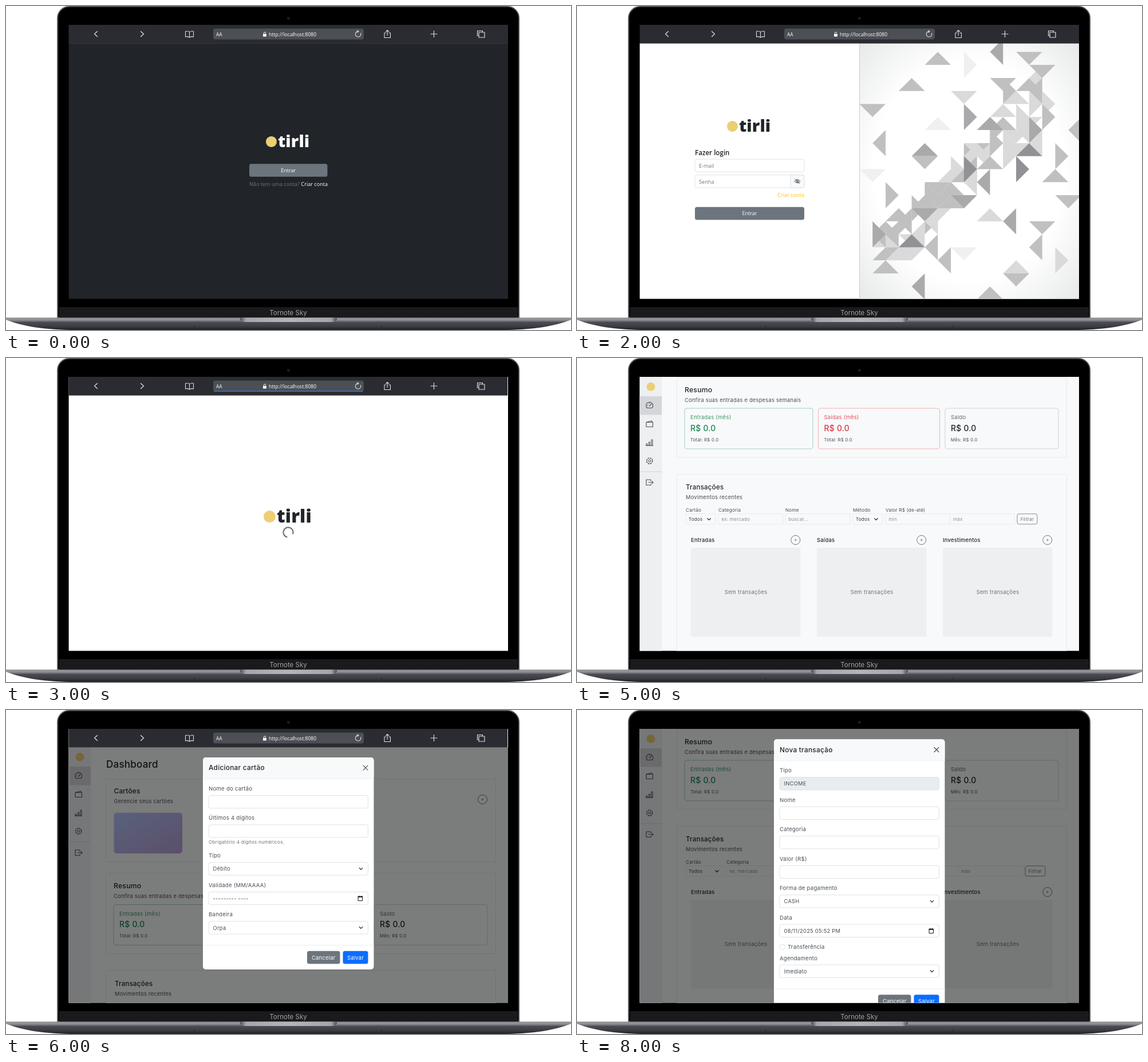
An HTML page that plays this animation: 987 px wide and 567 px high, repeating every 9000 ms.

```html
<!DOCTYPE html>
<html lang="pt">
<head>
<meta charset="utf-8">
<style>
  html, body { margin: 0; width: 100%; height: 100%; overflow: hidden; background: #fff }
  svg { display: block; width: 987px; height: 567px; font-family: "Open Sans", "Noto Sans", sans-serif }
  .app { font-family: Inter, sans-serif; letter-spacing: .015em }
  .line { fill: none; stroke-linecap: round; stroke-linejoin: round }
</style>
</head>
<body>
<svg id="stage" viewBox="0 0 987 567"></svg>
<script>
const INK = '#212529', GRAY = '#6c757d', SOFT = '#495057', RULE = '#dee2e6', PAPER = '#f8f9fa';

const text = (x, y, s, size, fill = INK, more = '') =>
  `<text x="${x}" y="${y}" font-size="${size}" fill="${fill}" ${more}>${s}</text>`;
const box = (x, y, x2, y2, fill, stroke = 'none', r = 0) =>
  `<rect x="${x}" y="${y}" width="${x2 - x}" height="${y2 - y}" rx="${r}" fill="${fill}" stroke="${stroke}"/>`;
const line = (d, stroke, width = 1) =>
  `<path class="line" d="${d}" stroke="${stroke}" stroke-width="${width}"/>`;
const dot = (x, y, r, fill, stroke = 'none') =>
  `<circle cx="${x}" cy="${y}" r="${r}" fill="${fill}" stroke="${stroke}"/>`;
const move = (x, y, s) => `<g transform="translate(${x} ${y})">${s}</g>`;
const screen = (y, fill) => box(109, y, 877, 513, fill);
const MID = 'text-anchor="middle"', END = 'text-anchor="end"', MEDIUM = 'font-weight="500"';

const defs = `<defs>
  <clipPath id="screen"><rect x="109.6" y="33" width="767.4" height="479.6"/></clipPath>
  <linearGradient id="base" x2="0" y2="1">
    <stop stop-color="#77787d"/><stop offset=".1" stop-color="#9b9ca1"/><stop offset=".27" stop-color="#77787e"/>
    <stop offset=".36" stop-color="#4b4c54"/><stop offset=".7" stop-color="#3c3d44"/><stop offset="1" stop-color="#1f2024"/>
  </linearGradient>
  <linearGradient id="notch">
    <stop stop-color="#4a4b50"/><stop offset=".06" stop-color="#a5a6aa"/><stop offset=".5" stop-color="#b4b5b9"/>
    <stop offset=".94" stop-color="#a5a6aa"/><stop offset="1" stop-color="#4a4b50"/>
  </linearGradient>
  <linearGradient id="card" x2="1" y2="1"><stop stop-color="#b3c4fa"/><stop offset="1" stop-color="#b9a0d6"/></linearGradient>
  <radialGradient id="panel" r=".72"><stop offset=".6" stop-color="#fff"/><stop offset="1" stop-color="#e6e8e8"/></radialGradient>
</defs>`;

const laptop =
  `<path d="M90.2 545V21A20 20 0 0 1 110.2 1H876A20 20 0 0 1 896 21V545Z" fill="#000" stroke="#505155" stroke-width="2"/>` +
  box(93, 527, 894, 545, '#1a1a1c') + dot(493.5, 21.5, 2.5, '#1d1d22') +
  text(493, 540.5, 'Tornote Sky', 11.5, '#a3a3a6', MID + ' font-family="Inter, sans-serif"') +
  `<path d="M0 545.5H987V549C960 560 920 567 865 567H122C67 567 27 560 0 549Z" fill="url(#base)"/>` +
  `<path d="M409 545.5H578V548Q577 553 570 553H417Q410 553 409 548Z" fill="url(#notch)"/>` +
  dot(329, 561, 1.2, '#2a2b30') + dot(656, 561, 1.2, '#2a2b30');

function browserBar(loading) {
  const c = '#dcdddf';
  return box(109, 33, 877, 65.6, '#2a2c31') +
    box(362, 39.5, 625, 58.5, '#4c4f54', 'none', 4) +
    (loading ? line('M364 58.3H623', '#1f7be6', 1.6) : '') +
    line('M159.5 44.5L154.5 49L159.5 53.5M235.5 44.5L240.5 49L235.5 53.5', c, 1.3) +
    line('M320.5 45.5Q317 43 313.5 44.5V54Q317 53 320.5 55Q324 53 327.5 54V44.5Q324 43 320.5 45.5V55', c, 1.1) +
    line('M663.5 47H661V55.5H671.5V47H669M666.2 51.5V42.5M663.5 45L666.2 42.3L669 45', c, 1.1) +
    line('M742 49H753M747.5 43.5V54.5', c, 1.2) +
    line('M826 52H823.5V43.5H832.5V46M826 46H836V55H826Z', c, 1.2) +
    line('M619.6 47.5A4.8 4.8 0 1 1 616 44.5L614 42.6M616 44.5L614 46.4', c, 1.1) +
    box(449, 49, 455, 53.5, '#fff', 'none', .8) + line('M450.3 49V47.5A1.7 1.7 0 0 1 453.7 47.5V49', '#fff') +
    text(367, 53, 'AA', 8.3, '#fff') + text(459, 53, 'http://localhost:8080', 8.6, '#fff');
}

const logo = (x, y, fill, k = 1) => `<g transform="translate(${x} ${y}) scale(${k})">` +
  dot(9.5, -9.5, 9.5, '#ecce74') + text(21, 0, 'tirli', 29, fill, 'font-weight="800"') + '</g>';

const button = (x, y, x2, s, fill = GRAY, size = 9.1) =>
  box(x, y, x2, y + 22.5, fill, 'none', 3.5) + text((x + x2) / 2, y + 14.7, s, size, '#fff', MID);

const welcome = screen(33, INK) + browserBar() + line('M109 66H877', '#34373c') + logo(454, 247, PAPER) +
  button(425, 276.3, 561.5, 'Entrar') +
  text(425, 314.7, 'Não tem uma conta?', 9.1, GRAY) +
  text(562, 314.7, 'Criar conta', 9.1, '#fff', END + ' ' + MEDIUM);

// Triangles on a square grid: base midpoint column, row and shade, grouped by where the tip points.
const mosaic = {
  up: [6,2,2, 4,4,2, 5,9,3, 13,9,4, 15,11,2, 2,18,2, 10,20,2, 4,16,4, 12,18,1, 6,7,0, 10,7,3, 10,14,1],
  down: [1,5,2, 8,4,1, 13,1,2, 14,2,2, 11,3,2, 8,12,3, 5,13,3, 16,12,2, 14,14,2, 12,18,2, 1,10,0, 5,9,2, 8,16,0],
  left: [2,8,2, 11,1,3, 12,14,3, 5,19,3, 7,17,2, 14,16,2, 10,11,3, 17,7,2, 14,8,1, 6,14,1, 2,15,2, 6,16,2],
  right: [8,6,3, 8,2,0, 12,10,4, 15,9,2, 2,12,2, 11,4,2, 13,7,3, 1,15,3, 3,14,2, 15,17,1, 8,10,4, 10,8,2]
};
const shades = ['#f0f0f0', '#dadadb', '#c0c0c1', '#aaaaad', '#919196'];
const tips = { up: [0, -1], down: [0, 1], left: [-1, 0], right: [1, 0] };

function triangle(side, cx, cy, shade) {
  const [dx, dy] = tips[side];
  const points = [[cx + dy, cy + dx], [cx - dy, cy - dx], [cx + dx, cy + dy]]
    .map(([x, y]) => [493.5 + 22.8 * x, 57.5 + 22.8 * y]);
  return `<polygon points="${points}" fill="${shades[shade]}"/>`;
}

function pattern() {
  let out = box(493.5, 65, 877, 513, 'url(#panel)'), seed = 5;
  const random = n => (seed = seed * 16807 % 2147483647) % n;
  // a dense band of pale pieces rises from the lower left to the upper right
  for (let x = 2; x < 15; x++)
    for (let y = 17 - x; y <= 20 - x; y++)
      if (y > 2 && y < 18) out += triangle(Object.keys(tips)[random(4)], x, y, 1 + random(2));
  for (const side in mosaic)
    for (let i = 0; i < mosaic[side].length; i += 3)
      out += triangle(side, ...mosaic[side].slice(i, i + 3));
  return out + line('M493.5 66V513', '#c9cccf');
}

function account(title, fields, link, action, shift) {
  let y = 254, form = '';
  for (const f of fields) {
    form += box(206, y, 397, y + 22.3, '#fff', RULE, 3.5) + text(213, y + 15, f, 9.2, GRAY);
    if (f === 'Senha') form += box(373, y, 397, y + 22.3, PAPER, RULE, 3) +
      line(`M380 ${y + 11}Q385 ${y + 5} 390 ${y + 11}Q385 ${y + 17} 380 ${y + 11}M381 ${y + 7}L389 ${y + 15}`, SOFT) +
      dot(385, y + 11, 1.8, 'none', SOFT);
    y += 27.7;
  }
  return screen(65, '#fff') + pattern() + browserBar() + move(0, shift,
    logo(262, 206, INK) + text(206, 246.5, title, 11.6, INK, 'font-weight="600"') + form +
    text(397, y + 10.8, link, 9.2, '#ffc107', END) + button(206, y + 28.3, 397, action));
}

const loading = screen(33, '#fff') + browserBar(true) + line('M876.6 33V66', '#fff') +
  logo(450, 288, INK, 1.1) + line('M490.5 313.3A8.6 8.6 0 1 1 501.3 307.5', GRAY, 2.2);

const chevron = (x, y) => line(`M${x - 2.8} ${y - 1.3}l2.8 2.8l2.8 -2.8`, '#343a40', 1.3);
const plus = (x, y) => dot(x, y, 8, 'none', GRAY) + line(`M${x - 1.6} ${y}h3.2M${x} ${y - 1.6}v3.2`, GRAY, .8);

const sidebar = box(109, 33, 148.5, 545, '#eeeff1') + box(109, 99, 148, 131.5, '#d5d6d9') + dot(129, 82.3, 7.5, '#ecce74') +
  line('M122.5 119.5A6 6 0 1 1 131 119.5ZM126.7 116L130 112.5M123 115h1M126.7 110.5v1', SOFT, 1.1) +
  line('M121 144.5H132.5V152.5H121ZM121.5 144.2L131 142V144', SOFT, 1.1) +
  line('M121 185v-3h2v3zM125.5 185v-6h2v6zM130 185v-10h2v10zM120.5 185.2h12', SOFT) +
  dot(126.7, 212, 2, 'none', SOFT) +
  `<circle cx="126.7" cy="212" r="5" fill="none" stroke="${SOFT}" stroke-width="1.6" stroke-dasharray="2.6 1.33"/>` +
  line('M110 231H148', '#d0d3d6') +
  line('M129 247V245H121V254.5H129V252.5M125 249.8H133M131 247.6L133 249.8L131 252', SOFT, 1.1);

function summary(x, x2, name, total, color, edge) {
  const label = color === INK ? SOFT : color;
  return box(x, 340.5, x2, 411.5, PAPER, edge, 4) +
    text(x + 10, 359.7, name, 9.5, label, 'opacity=".85"') +
    text(x + 10, 380, 'R$ 0.0', 13.9, color, MEDIUM) + text(x + 10, 398, total + ': R$ 0.0', 7.8, SOFT);
}

// extra widens the card filter once a card exists
function filters(extra) {
  const entry = (x, label, hint) => text(x, 521, label, 8.1, SOFT) +
    box(x, 525, x + 113, 543.5, PAPER, '#e6e9ec', 3) + text(x + 5.5, 537.5, hint, 8, '#868e96');
  const choice = (x, x2, label) => text(x, 521, label, 8.1, SOFT) +
    box(x, 525, x2, 543.5, PAPER, '#e6e9ec', 3) + text(x + 5, 537.5, 'Todos', 8, '#343a40') + chevron(x2 - 11.5, 534.5);
  return choice(190, 242 + extra, 'Cartão') + move(extra, 0,
    entry(247, 'Categoria', 'ex: mercado') + entry(364, 'Nome', 'buscar...') + choice(482, 534, 'Método') +
    entry(539, 'Valor R$ (de-até)', 'min') + entry(651.5, '', 'máx') +
    box(769, 525.3, 804, 543.3, 'none', '#868e96', 3) + text(786.5, 537.5, 'Filtrar', 8, GRAY, MID));
}

const heading = (x, y, title, sub, size = 11.8) =>
  text(x, y, title, size, INK, MEDIUM) + text(x, y + 17, sub, 9.3, SOFT);
const frame = (y, y2) => box(174.5, y, 855.5, y2, PAPER, '#e5e8ea', 2);

function dashboard(scrolled, extra = 0) {
  const columns = [[199, 'Entradas'], [419, 'Saídas'], [639, 'Investimentos']].map(([x, name]) =>
    text(x, 574.7, name, 9.4, INK, MEDIUM) + plus(x + 182.8, 571) + box(x, 584.5, x + 191.5, 740, '#eeeff0', 'none', 3) +
    text(x + 96, 665, 'Sem transações', 9.4, GRAY, MID)).join('');
  const page = text(175, 100.5, 'Dashboard', 17, INK, MEDIUM) +
    frame(120.5, 266) + heading(188.5, 146, 'Cartões', 'Gerencie seus cartões') + plus(832.5, 156.5) +
    box(188.5, 179.7, 308, 251, 'url(#card)', 'none', 5) +
    frame(286, 426.5) + heading(188, 312, 'Resumo', 'Confira suas entradas e despesas semanais', 12.2) +
    summary(188, 412, 'Entradas (mês)', 'Total', '#198754', '#a3cfbb') +
    summary(421.5, 633.5, 'Saídas (mês)', 'Total', '#dc3545', '#f1aeb5') +
    summary(643, 841, 'Saldo', 'Mês', INK, '#ced4da') +
    frame(455.7, 800) + heading(190, 482.5, 'Transações', 'Movimentos recentes', 11.5) + filters(extra) + columns;
  return '<g class="app">' + screen(33, PAPER) + move(0, scrolled ? -252.5 : 0, page) +
    move(0, scrolled ? -32 : 0, sidebar) + '</g>' + (scrolled ? '' : browserBar() + line('M876.6 33V66', '#fff'));
}

const shade = y => `<rect x="109" y="${y}" width="768" height="480" opacity=".5"/>`;

function modal(y, title, fields, foot, more) {
  const body = fields.map(([label, top, value = '', kind]) =>
    text(354, top - 8.5, label, 9.6, SOFT) +
    box(354, top, 632.5, top + 22.3, kind === 'fixed' ? '#e9ecef' : '#fff', RULE, 3.5) +
    text(361.5, top + 14.7, value, 9.4, SOFT) +
    (kind === 'list' ? chevron(620, top + 11) : '') +
    (kind === 'date' ? line(`M615.5 ${top + 8}h7v7.5h-7zM617 ${top + 7}v1M621 ${top + 7}v1`, '#111') +
      line(`M615.5 ${top + 8.6}h7`, '#111', 1.8) : '')).join('');
  return '<g class="app">' + box(344, y, 642.5, foot + 42.5, '#fff', 'none', 5) +
    box(344, y, 642.5, y + 37.5, PAPER, 'none', 5) + line(`M344 ${y + 37.5}H642.5`, '#eff1f2') +
    text(354, y + 22.3, title, 11.9, INK, MEDIUM) +
    line(`M624 ${y + 14.2}l8 8m0 -8l-8 8`, SOFT, 1.2) + body + more + line(`M344 ${foot}H642.5`, '#eceef0') +
    button(526, foot + 10.3, 583.5, 'Cancelar', GRAY, 9.4) + button(588.5, foot + 10.3, 632.5, 'Salvar', '#0d6efd', 9.4) + '</g>';
}

const newCard = modal(83, 'Adicionar cartão', [
  ['Nome do cartão', 149.5], ['Últimos 4 dígitos', 200.8], ['Tipo', 266.7, 'Débito', 'list'],
  ['Validade (MM/AAAA)', 318.3, '--------- ----', 'date'], ['Bandeira', 369.8, 'Orpa', 'list']
], 411.5, text(354, 234, 'Obrigatório 4 dígitos numéricos.', 8.2, GRAY));

const newEntry = modal(51.3, 'Nova transação', [
  ['Tipo', 117.7, 'INCOME', 'fixed'], ['Nome', 169.3], ['Categoria', 220.7], ['Valor (R$)', 272.2],
  ['Forma de pagamento', 323.7, 'CASH', 'list'], ['Data', 375.2, '08/11/2025 05:52 PM', 'date'],
  ['Agendamento', 446, 'Imediato', 'list']
], 488, box(354.5, 410.3, 363, 418.8, '#fff', RULE, 2) + text(368, 418, 'Transferência', 9.5, SOFT));

const scenes = [
  welcome,
  account('Cadastre-se', ['Nome completo', 'E-mail', 'Senha'], 'Fazer login', 'Continuar', 0),
  account('Fazer login', ['E-mail', 'Senha'], 'Criar conta', 'Entrar', 14),
  loading,
  dashboard(false),
  dashboard(true),
  dashboard(false) + shade(65.6) + newCard,
  dashboard(false, 14),
  dashboard(true, 14) + shade(33) + newEntry
];

const stage = document.getElementById('stage');
stage.innerHTML = defs + laptop +
  `<g clip-path="url(#screen)">${scenes.map(s => `<g class="scene">${s}</g>`).join('')}</g>`;
const layers = stage.querySelectorAll('.scene');

function draw() {
  const now = Math.floor(performance.now() % 9000 / 1000);
  layers.forEach((layer, i) => layer.style.display = i === now ? '' : 'none');
  requestAnimationFrame(draw);
}
draw();
</script>
</body>
</html>
```
